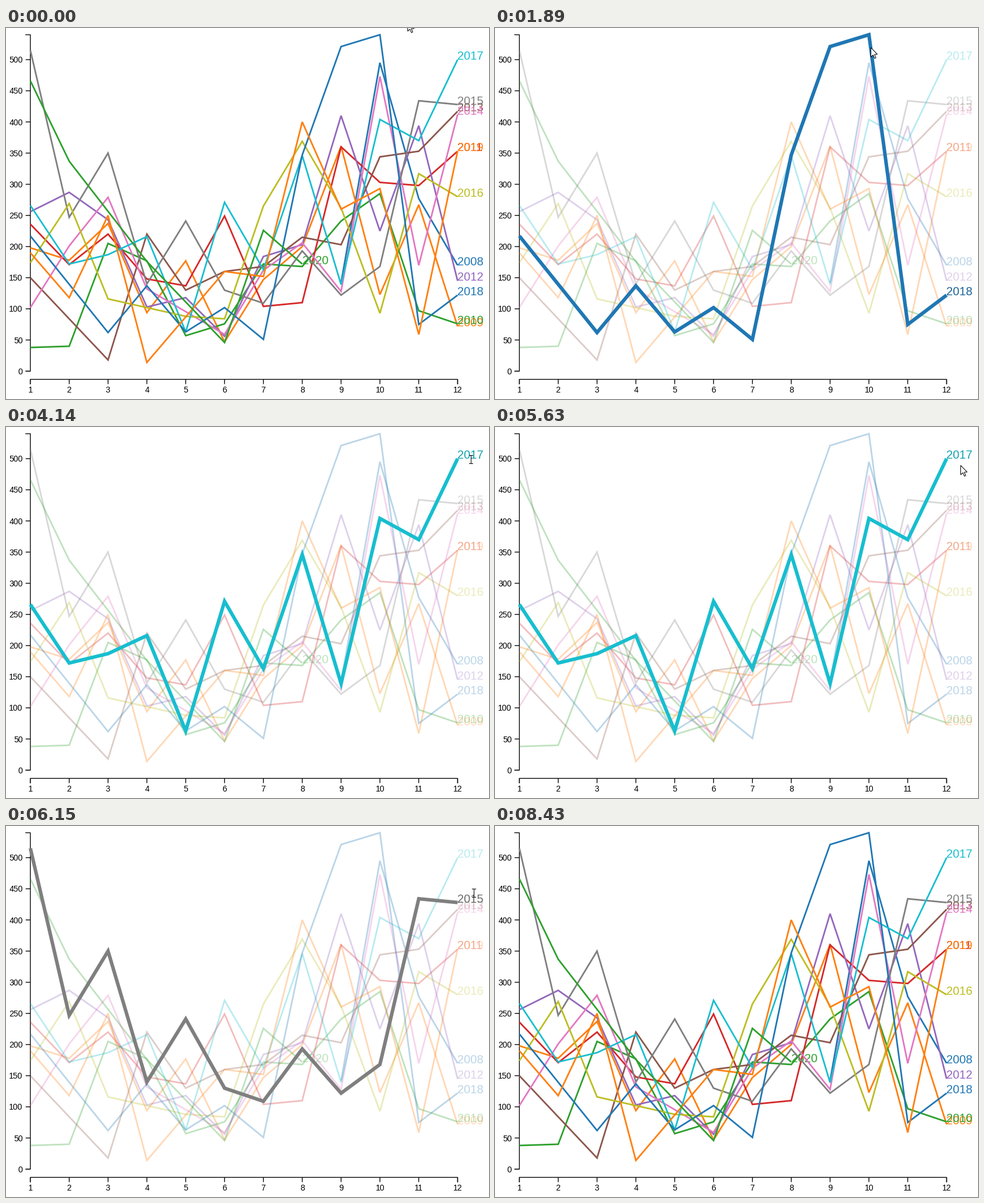
Animation of 823 by 633 pixels, one loop 9580 ms. Source, as a matplotlib script:

```python
import numpy as np
import matplotlib.pyplot as plt
from matplotlib.animation import FuncAnimation
from matplotlib.patches import Polygon

W, H, DPI = 823, 633, 64
PT = 72 / DPI                      # points per pixel
LOOP, STEP = 9580, 20
FONT = "Liberation Sans"
LEFT, RIGHT, TOP, ZERO, BASE = 41.5, 769.5, 11.5, 585.5, 599.5
THIN, THICK, FADED = 2.75, 6, 0.3
PALETTE = plt.get_cmap("tab10").colors
FIRST_YEAR = 2008

# Monthly values at the bends; a gap lies on the straight line between them.
_ = np.nan
VALUES = [
    [142, 495, 277, 170],
    [198, 178, 237, 94, 177, 47, 147, 200, 361, 123, 267, 72],
    [38, 40, 205, 177, 57, 76, 172, 168, 241, 285, 97, 76],
    [236, 171, 220, 148, 137, 249, 104, 110, 360, 303, 298, 353],
    [256, 287, 243, 103, 118, 56, 184, 203, 410, 225, 394, 145],
    [150, _, 18, 220, 130, 160, 168, 215, 203, 344, 353, 417],
    [102, 201, 279, 132, _, 59, 162, 206, 128, 473, 170, 412],
    [515, 247, 350, 140, 241, 130, 109, 193, 122, 168, 434, 428],
    [174, 269, 116, _, 88, 84, 265, 369, 262, 93, 317, 280],
    [266, 172, 187, 216, 63, 271, 163, 346, 139, 404, 370, 500],
    [217, _, 62, 137, 63, 102, 51, 347, 521, 540, 75, 122],
    [190, 118, 250, 14, _, 160, 152, 400, 260, 293, 59, 353],
    [466, 337, _, 176, _, 46, 226, 172],
]

# Pointer moves: start ms, end ms, goal
START = (684, -11)
MOVES = [(670, 1200, (649, 30)), (1330, 1470, (642, 31)),
         (1840, 1860, (640, 33)), (3400, 3460, (648, 33)),
         (3480, 4140, (792, 54)), (5600, 5620, (793, 65)),
         (5620, 6120, (797, 113)), (8180, 8420, (830, 122))]
ARROW = np.array([(0, 0), (0, 16), (3.7, 12.5), (6.3, 18.4), (8.6, 17.4),
                  (6.1, 11.6), (11, 11.4)]) + 0.5
BEAM = np.array([(-3, -7), (3, -7), (0, -7), (0, 7), (-3, 7), (3, 7)]) + 0.5


def month_x(month):
    return LEFT + (RIGHT - LEFT) * (month - 1) / 11


def value_y(value):
    return ZERO - value * 1.063


def fill_gaps(values):
    values = np.array(values, float)
    known = np.flatnonzero(~np.isnan(values))
    return np.interp(np.arange(len(values)), known, values[known])


fig = plt.figure(figsize=(W / DPI, H / DPI), dpi=DPI, facecolor="white")
ax = fig.add_axes([0, 0, 1, 1])
ax.set(xlim=(0, W), ylim=(H, 0))
ax.axis("off")


def write(x, y, text, size, **style):
    return ax.text(x, y, text, fontsize=size * PT, family=FONT,
                   va="baseline", **style)


def draw_axes():
    strokes = [[(33, TOP), (LEFT, TOP), (LEFT, ZERO), (33, ZERO)],
               [(LEFT, 608), (LEFT, BASE), (RIGHT, BASE), (RIGHT, 608)]]
    for value in range(0, 501, 50):
        y = value_y(value)
        strokes.append([(33.5, y), (LEFT, y)])
        write(28.5, y + 5.2, str(value), 14, ha="right", color="black")
    for month in range(1, 13):
        x = month_x(month)
        strokes.append([(x, BASE), (x, 607.5)])
        write(x, 622, str(month), 14, ha="center", color="black")
    for stroke in strokes:
        ax.plot(*zip(*stroke), color="black", lw=1.35 * PT, snap=False,
                solid_capstyle="butt", solid_joinstyle="miter", zorder=1)


class Series:
    def __init__(self, index, values):
        first = 9 if index == 0 else 1
        x = month_x(np.arange(first, first + len(values)))
        self.points = np.column_stack([x, value_y(fill_gaps(values))])
        self.color = PALETTE[index % len(PALETTE)]
        self.dark = tuple(0.85 * c for c in self.color)
        self.line, = ax.plot(*self.points.T, color=self.color,
                             solid_capstyle="butt", solid_joinstyle="miter")
        self.label = write(*self.points[-1], str(FIRST_YEAR + index), 20)

    def label_hit(self, tip):
        dx, dy = tip - self.points[-1]
        return 0 <= dx <= 44 and -18 <= dy <= 4

    def line_hit(self, tip):
        a, d = self.points[:-1], np.diff(self.points, axis=0)
        u = ((tip - a) * d).sum(1) / (d * d).sum(1)
        foot = a + np.clip(u, 0, 1)[:, None] * d
        return np.hypot(*(tip - foot).T).min() <= THIN / 2

    def style(self, focus):
        on = focus is self
        alpha = 1 if on or focus is None else FADED
        self.line.set(lw=(THICK if on else THIN) * PT, alpha=alpha,
                      zorder=4 if on else 3)
        self.label.set(color=self.dark if on else self.color, alpha=alpha,
                       zorder=2)


draw_axes()
series = [Series(i, values) for i, values in enumerate(VALUES)]
arrow = ax.add_patch(Polygon(ARROW, fc="white", ec="black", lw=PT, zorder=9))
beam, = ax.plot([], [], color="black", lw=PT, zorder=9)


def pointer_at(t):
    pos = np.array(START, float)
    for begin, end, goal in MOVES:
        u = np.clip((t - begin) / (end - begin), 0, 1)
        pos += (np.array(goal) - pos) * u * u * (3 - 2 * u)
    return np.round(pos)


def hovered(tip):
    hits = (s for s in series if s.label_hit(tip) or s.line_hit(tip))
    return next(hits, None)


def update(i):
    t = i * STEP
    tip = pointer_at(t)
    # The chart reacts one step after the pointer.
    focus = hovered(pointer_at(t - STEP))
    for s in series:
        s.style(focus)
    typing = any(s.label_hit(tip) for s in series)
    arrow.set_visible(not typing)
    beam.set_visible(typing)
    arrow.set_xy(ARROW + tip)
    beam.set_data(*(BEAM + tip).T)
    return []


anim = FuncAnimation(fig, update, frames=LOOP // STEP, interval=STEP,
                     init_func=lambda: update(0), repeat=True, repeat_delay=0)
plt.show()
```
